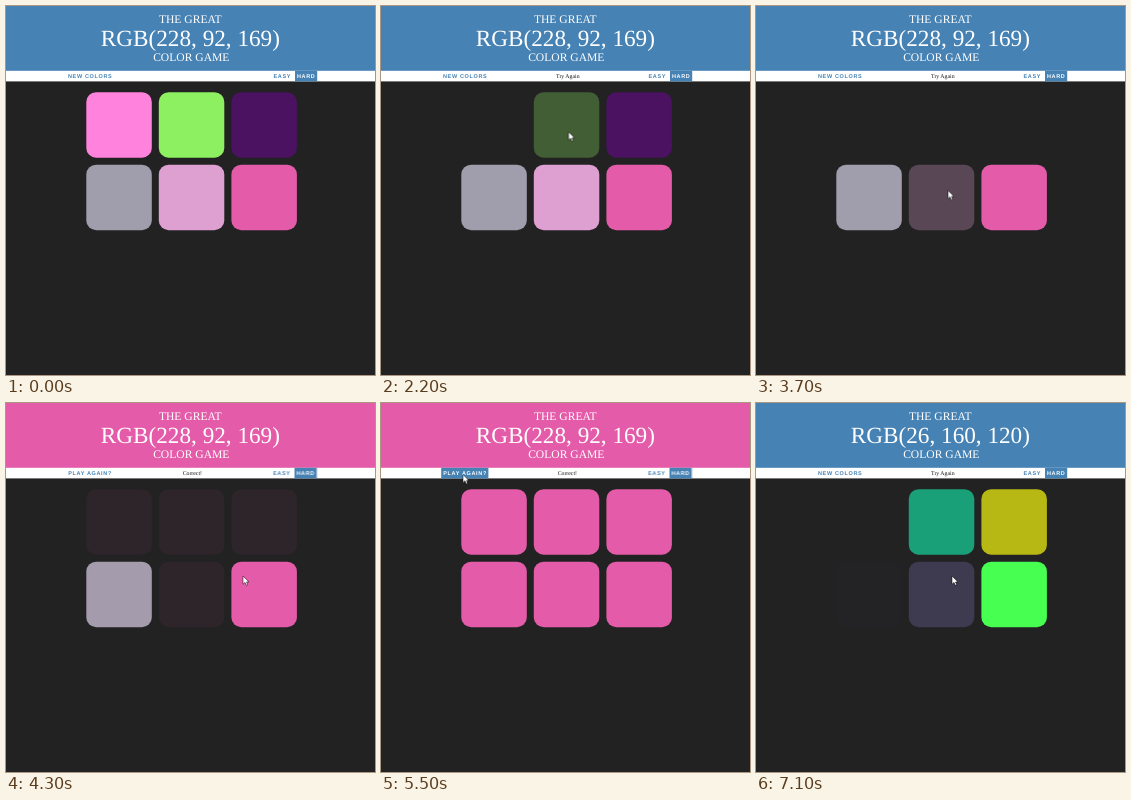
Animation of 369 by 369 pixels, one loop 7.2 s. Source, as an HTML page:

```html
<!DOCTYPE html>
<html lang="en">
<head>
<meta charset="utf-8">
<title>Color Game</title>
<style>
:root { --bg: #232223; --blue: #4682b4; --pink: #e45ca9; }
html, body { margin: 0; width: 100%; height: 100%; overflow: hidden; background: var(--bg); }
svg { display: block; width: 100vw; height: 100vh; }
text { text-rendering: geometricPrecision; }
.title { font: 11.6px "Liberation Serif", "Times New Roman", serif; fill: #fff; text-anchor: middle; }
.title .big { font-size: 23.2px; }
.msg { font: 5.8px "Liberation Serif", "Times New Roman", serif; fill: #111; text-anchor: middle; }
.btn { font: bold 5.5px "Liberation Sans", Arial, sans-serif; letter-spacing: .65px; fill: var(--blue); }

/* Every animation shares one 7.2 s loop */
.a { animation: 7.2s ease infinite; }
.step { animation-timing-function: step-end; }

/* Hard state changes: win at 59.17%, new round at 77.22% */
.head { animation-name: head; fill: var(--blue); }
@keyframes head { 0%, 77.22%, 100% { fill: var(--blue); } 59.17% { fill: var(--pink); } }
.won { animation-name: won; }
@keyframes won { 0%, 77.22%, 100% { opacity: 0; } 59.17% { opacity: 1; } }
.play { animation-name: play; }
@keyframes play { 0%, 77.22%, 100% { opacity: 1; } 59.17% { opacity: 0; } }
.round1 { animation-name: round1; }
@keyframes round1 { 0% { opacity: 1; } 77.22%, 100% { opacity: 0; } }
.round2 { animation-name: round2; }
@keyframes round2 { 0% { opacity: 0; } 77.22%, 100% { opacity: 1; } }
.wrong { animation-name: wrong; }
@keyframes wrong { 0%, 59.17% { opacity: 0; } 15.97%, 85.56%, 100% { opacity: 1; } }
.modes { animation-name: modes; }
@keyframes modes { 0%, 77.22%, 100% { transform: none; } 59.17% { transform: translateX(-.5px); } }

/* Button hover */
.hover { animation-name: hover; }
@keyframes hover { 0%, 71%, 83%, 100% { opacity: 0; } 75%, 78.4% { opacity: 1; } }
.label { animation-name: label; }
@keyframes label { 0%, 71%, 83%, 100% { fill: var(--blue); } 75%, 78.4% { fill: #fff; } }

/* Squares: --c first round, --n second round */
.s1 { --c: #ff82dc; --n: #964a56; animation-name: s1; }
.s2 { --c: #8df060; --n: #1aa078; animation-name: s2; }
.s3 { --c: #4a1260; --n: #b8b814; animation-name: s3; }
.s4 { --c: #a09eac; --n: #464ea8; animation-name: s4; }
.s5 { --c: #dda0d0; --n: #413e55; animation-name: s5; }
.s6 { --c: #e45ca9; --n: #46ff50; animation-name: s6; }
@keyframes s1 {
  0%, 15.97% { fill: var(--c); }
  24.31%, 59.17% { fill: var(--bg); }
  67.5%, 77.22% { fill: var(--pink); }
  85.56% { fill: var(--n); }
  93.89%, 100% { fill: var(--bg); }
}
@keyframes s2 {
  0%, 27.08% { fill: var(--c); }
  35.42%, 59.17% { fill: var(--bg); }
  67.5%, 77.22% { fill: var(--pink); }
  85.56%, 100% { fill: var(--n); }
}
@keyframes s3 {
  0%, 37.08% { fill: var(--c); }
  45.42%, 59.17% { fill: var(--bg); }
  67.5%, 77.22% { fill: var(--pink); }
  85.56%, 100% { fill: var(--n); }
}
@keyframes s4 {
  0%, 59.17% { fill: var(--c); }
  67.5%, 77.22% { fill: var(--pink); }
  85.56%, 91.39% { fill: var(--n); }
  99.72%, 100% { fill: var(--bg); }
}
@keyframes s5 {
  0%, 47.92% { fill: var(--c); }
  56.25%, 59.17% { fill: var(--bg); }
  67.5%, 77.22% { fill: var(--pink); }
  85.56% { fill: var(--n); }
  97.78% { fill: var(--n); animation-timing-function: ease-in; }
  100% { fill: #33313e; }
}
@keyframes s6 {
  0%, 77.22% { fill: var(--c); }
  85.56%, 100% { fill: var(--n); }
}

.cursor { animation-name: cursor; animation-timing-function: ease-in-out; }
@keyframes cursor {
  0%, 1.3% { transform: translate(400px, 160px); }
  1.38% { transform: translate(332px, 160px); }
  11.1%, 20.8% { transform: translate(136px, 130px); }
  25%, 29.9% { transform: translate(185px, 126px); }
  34.7%, 41% { transform: translate(250px, 121.5px); }
  45.8%, 50.7% { transform: translate(190px, 185px); }
  55.5%, 63.9% { transform: translate(237px, 173px); }
  71.5%, 77.8% { transform: translate(82px, 71.5px); }
  81.9% { transform: translate(107px, 100px); }
  84%, 86.5% { transform: translate(112px, 120px); }
  91%, 92.5% { transform: translate(118px, 180px); }
  97%, 100% { transform: translate(196px, 173px); }
}
</style>
</head>
<body>
<svg viewBox="0 0 369 369">
  <rect class="a step head" width="369" height="65"/>
  <g class="title">
    <text x="184.3" y="17">THE GREAT</text>
    <text class="big a step round1" x="184.4" y="40">RGB(228, 92, 169)</text>
    <text class="big a step round2" x="184.4" y="40">RGB(26, 160, 120)</text>
    <text x="185.3" y="55">COLOR GAME</text>
  </g>

  <rect y="64.8" width="369" height="10.6" fill="#fff"/>
  <rect class="a hover" x="60.2" y="64.8" width="47.2" height="10.6" fill="#4682b4"/>
  <g class="btn">
    <g class="a step play"><text class="a label" x="62" y="72">NEW COLORS</text></g>
    <g class="a step won"><text class="a label" x="62.3" y="72">PLAY AGAIN?</text></g>
    <g class="a step modes">
      <text x="267.5" y="72">EASY</text>
      <rect x="289" y="64.8" width="22.2" height="10.6"/>
      <text x="290.9" y="72" fill="#fff" style="fill:#fff">HARD</text>
    </g>
  </g>
  <g class="msg">
    <text class="a step wrong" x="186.8" y="72">Try Again</text>
    <text class="a step won" x="186.3" y="72">Correct!</text>
  </g>

  <defs><rect id="sq" width="65.5" height="65.5" rx="9.8"/></defs>
  <use class="a s1" href="#sq" x="80.3" y="86.2"/>
  <use class="a s2" href="#sq" x="152.8" y="86.2"/>
  <use class="a s3" href="#sq" x="225.4" y="86.2"/>
  <use class="a s4" href="#sq" x="80.3" y="158.7"/>
  <use class="a s5" href="#sq" x="152.8" y="158.7"/>
  <use class="a s6" href="#sq" x="225.4" y="158.7"/>

  <path class="a cursor" d="M0 0V8.2L2 6.4 3.3 9.3 4.7 8.7 3.5 5.9H6Z" fill="#fff" stroke="#000" stroke-width=".5"/>
</svg>
</body>
</html>
```
